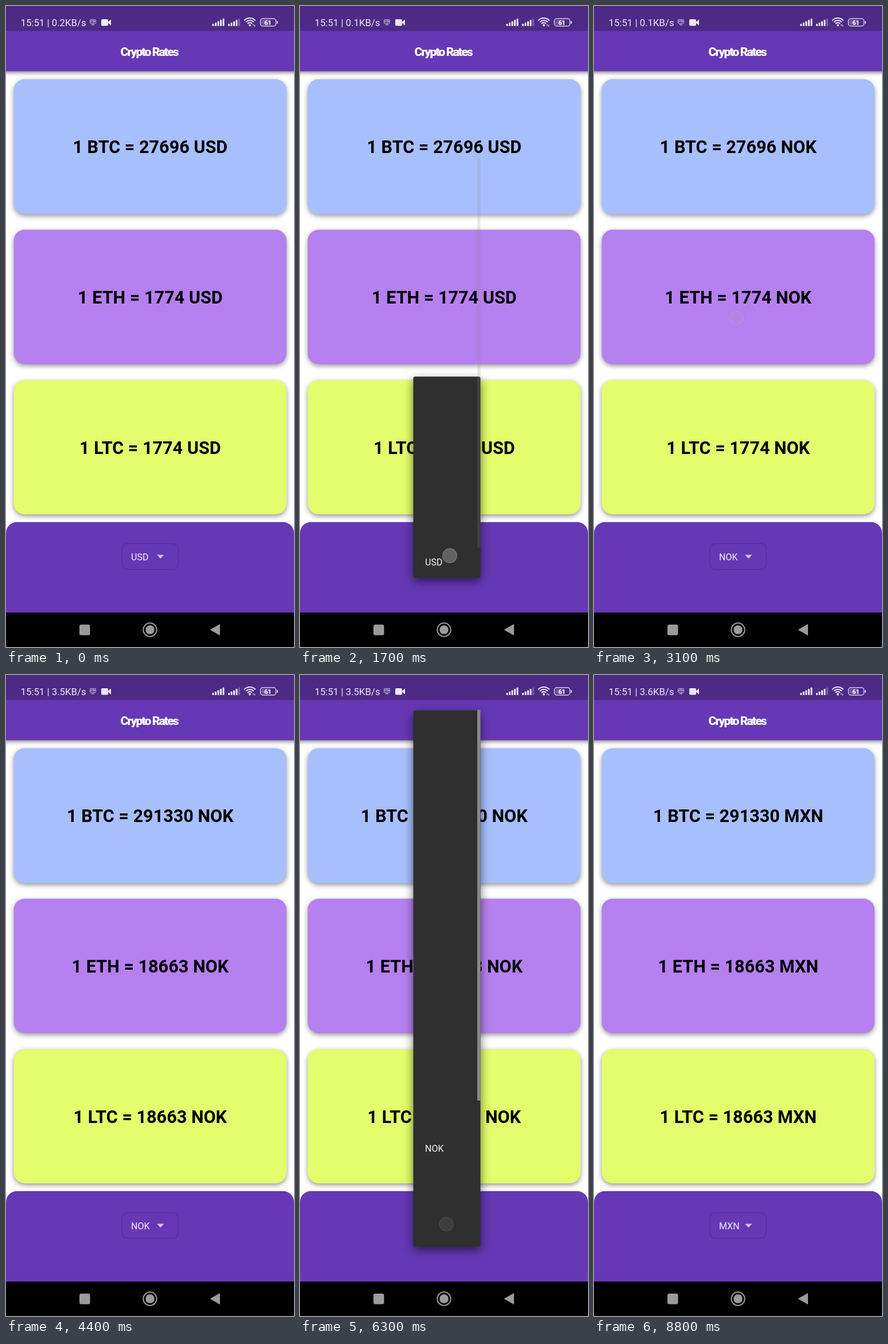
Animation of 502 by 1116 pixels, one loop 8.9 s. Source, as an HTML page with a canvas:

```html
<!DOCTYPE html>
<html lang="en">
<head>
<meta charset="utf-8">
<title>Crypto Rates</title>
<style>
html, body { margin: 0; width: 100%; height: 100%; overflow: hidden; background: #fff; }
canvas { display: block; }
</style>
</head>
<body>
<canvas id="stage" width="502" height="1116"></canvas>
<script>
const ctx = document.getElementById('stage').getContext('2d');
const LOOP = 8900, STEP = 100;
const CODES = 'AUD BRL CAD CNY EUR GBP HKD IDR ILS INR JPY MXN NOK NZD PLN RON RUB SEK SGD USD ZAR'.split(' ');
const ROW = 61.3, FIRST_ROW = 102.2, MENU_TOP = 61.5, MENU_BOTTOM = 995.5;
const PURPLE = '#6638b5', SANS = 'Roboto, "Open Sans", sans-serif';

const MENUS = [
  { open: 1600, close: 2950, code: 'USD', scroll: 299 },
  { open: 6150, close: 7350, code: 'NOK', scroll: 14 }
];
const TAPS = [
  { up: 1600, x: 261, y: 957 }, { up: 2950, x: 248, y: 543 },
  { up: 6150, x: 255, y: 956 }, { up: 7350, x: 251, y: 755 }
];
const CARDS = [
  { y: 127.5, h: 235, color: '#a8bffe', coin: 'BTC' },
  { y: 389.5, h: 234, color: '#b580ef', coin: 'ETH' },
  { y: 651.5, h: 233.5, color: '#e3fd6c', coin: 'LTC' }
];

const clamp = v => Math.max(0, Math.min(1, v));

function box(x, y, w, h, r, fill, stroke, line = 1) {
  ctx.beginPath();
  ctx.roundRect(x, y, w, h, r);
  if (fill) { ctx.fillStyle = fill; ctx.fill(); }
  if (stroke) { ctx.strokeStyle = stroke; ctx.lineWidth = line; ctx.stroke(); }
}

function disc(x, y, r, fill, stroke, line) {
  box(x - r, y - r, 2 * r, 2 * r, r, fill, stroke, line);
}

function poly(fill, ...pts) {
  ctx.beginPath();
  for (let i = 0; i < pts.length; i += 2) ctx.lineTo(pts[i], pts[i + 1]);
  ctx.closePath();
  ctx.fillStyle = fill;
  ctx.fill();
}

function text(s, x, y, font, fill, align = 'left', spacing = 0) {
  ctx.font = font + ' ' + SANS;
  ctx.letterSpacing = spacing + 'px';
  ctx.textAlign = align;
  ctx.fillStyle = fill;
  ctx.fillText(s, x, y);
  ctx.letterSpacing = '0px';
}

function shadowed(color, blur, dy, draw) {
  ctx.save();
  ctx.shadowColor = color;
  ctx.shadowBlur = blur;
  ctx.shadowOffsetY = dy;
  draw();
  ctx.restore();
}

function signal(x, lastColor) {
  for (let i = 0; i < 5; i++) {
    const h = 4 + i * 2.3;
    box(x + i * 4.5, 35 - h, 3, h, 1, i === 4 ? lastColor : '#eee8f6');
  }
}

function statusBar(t) {
  const light = '#eee8f6';
  box(0, 0, 502, 43.5, 0, '#4c2a86');
  const speed = t < 400 ? '0.2' : t < 4400 ? '0.1' : t < 8400 ? '3.5' : '3.6';
  text(`15:51 | ${speed}KB/s`, 25.5, 35, '16.8px', light);
  box(146.5, 23.5, 10, 7, 1, null, '#c9bbe0');
  text('FTP', 151.5, 29, 'bold 4.5px', light, 'center');
  box(149, 32, 5, 1.3, 0, '#c9bbe0');
  box(166, 23, 12, 11.5, 2, light);
  poly(light, 177, 28.5, 183, 23.5, 183, 34);

  signal(359.5, light);
  signal(387, '#7a5ea8');
  ctx.lineCap = 'butt';
  ctx.strokeStyle = light;
  ctx.lineWidth = 2;
  for (const r of [13.5, 9.5, 5.5]) {
    ctx.beginPath();
    ctx.arc(425, 34.5, r, -Math.PI * 0.76, -Math.PI * 0.24);
    ctx.stroke();
  }
  disc(425, 33.5, 2, light);
  poly(light, 430, 32, 432, 32, 431, 35.5);
  poly(light, 432.5, 35.5, 434.5, 35.5, 433.5, 32);
  box(443.5, 22, 27, 13, 4, null, '#d8cce9', 1.5);
  box(445.5, 24, 15, 9, 2, 'rgba(255,255,255,.22)');
  box(472, 26, 2, 5, 1, '#d8cce9');
  text('61', 456.5, 32.5, 'bold 11px', '#fff', 'center');
}

function navBar() {
  const grey = '#9b9b9b';
  box(0, 1056, 502, 60, 0, '#000');
  box(128, 1077, 18.5, 18.5, 3, grey);
  disc(251, 1086, 11.7, null, grey, 2);
  disc(251, 1086, 7.8, grey);
  poly(grey, 355.5, 1086, 373, 1076, 373, 1096);
}

function screen(t) {
  const code = t < 2950 ? 'USD' : t < 7350 ? 'NOK' : 'MXN';
  const loaded = t >= 4000;
  box(0, 0, 502, 1116, 0, '#fff');
  shadowed('rgba(0,0,0,.5)', 7, 2, () => box(-10, 43, 522, 70.5, 0, PURPLE));
  text('Crypto Rates', 199.5, 87, '900 21px', '#fff', 'left', -1.9);

  for (const { y, h, color, coin } of CARDS) {
    shadowed('rgba(0,0,0,.42)', 9, 3, () => box(13.5, y, 475.5, h, 19, color));
    const rate = coin === 'BTC' ? (loaded ? 291330 : 27696) : (loaded ? 18663 : 1774);
    text(`1 ${coin} = ${rate} ${code}`, 251.3, y + 128.5, '600 30.6px', '#000', 'center');
  }

  box(0, 898.5, 502, 160, [19, 19, 0, 0], PURPLE);
  box(202, 936, 98.5, 45, 10, null, '#5c31a6', 2);
  text(code, 218, 964.5, '16px', '#f4f0fa');
  poly('#d1c4e9', 263, 955.5, 275.5, 955.5, 269.2, 962);
  statusBar(t);
  navBar();
}

function menu(t, { open, close, code, scroll }) {
  const age = t - open, gone = clamp((t - close) / 75);
  if (age < 0 || gone === 1) return;
  const p = age / 300, index = CODES.indexOf(code);
  const rowY = i => FIRST_ROW + i * ROW - scroll;
  const grow = clamp((p - 0.25) / 0.25);
  const from = rowY(index) - ROW / 2;
  const top = from + (MENU_TOP - from) * grow;
  const startBottom = Math.min(from + ROW, MENU_BOTTOM);
  const bottom = startBottom + (MENU_BOTTOM - startBottom) * grow;
  const alpha = clamp(p * 4) * (1 - gone);

  ctx.save();
  ctx.globalAlpha = alpha;
  shadowed('rgba(0,0,0,.55)', 17, 6, () => box(197.5, top, 117, bottom - top, 3, '#2f2f2f'));
  ctx.save();
  ctx.beginPath();
  ctx.rect(197.5, top, 117, bottom - top);
  ctx.clip();
  // Rows other than the selected one fade in one after another.
  const unit = 0.5 / (CODES.length + 1.5);
  CODES.forEach((name, i) => {
    const show = i === index ? 1 : clamp((p - 0.5 - (i + 1) * unit) / (1.5 * unit));
    ctx.globalAlpha = alpha * show;
    if (show) text(name, 218, rowY(i) + 5.7, '16px', '#f2f2f2');
  });
  ctx.restore();

  const thumb = clamp((age - 75) / 75) ** 1.5 * clamp((1100 - age) / 300);
  ctx.globalAlpha = alpha * thumb;
  box(309, 60.5 + (scroll - 14) * 0.709, 5.5, 680.5, 0, '#888');
  ctx.restore();
}

function tap(t, { up, x, y }) {
  const age = t - up;
  if (age < -100 || age >= 200) return;
  ctx.save();
  ctx.globalAlpha = age < 100 ? 1 : ((200 - age) / 100) ** 1.7;
  shadowed('rgba(0,0,0,.5)', 4, 0, () => disc(x, y, 13, 'rgba(255,255,255,.27)'));
  disc(x, y, 12.3, null, 'rgba(255,255,255,.12)', 1.5);
  ctx.restore();
}

function frame(now) {
  const t = Math.floor((now % LOOP) / STEP) * STEP;
  screen(t);
  MENUS.forEach(m => menu(t, m));
  TAPS.forEach(p => tap(t, p));
  requestAnimationFrame(frame);
}
requestAnimationFrame(frame);
</script>
</body>
</html>
```
